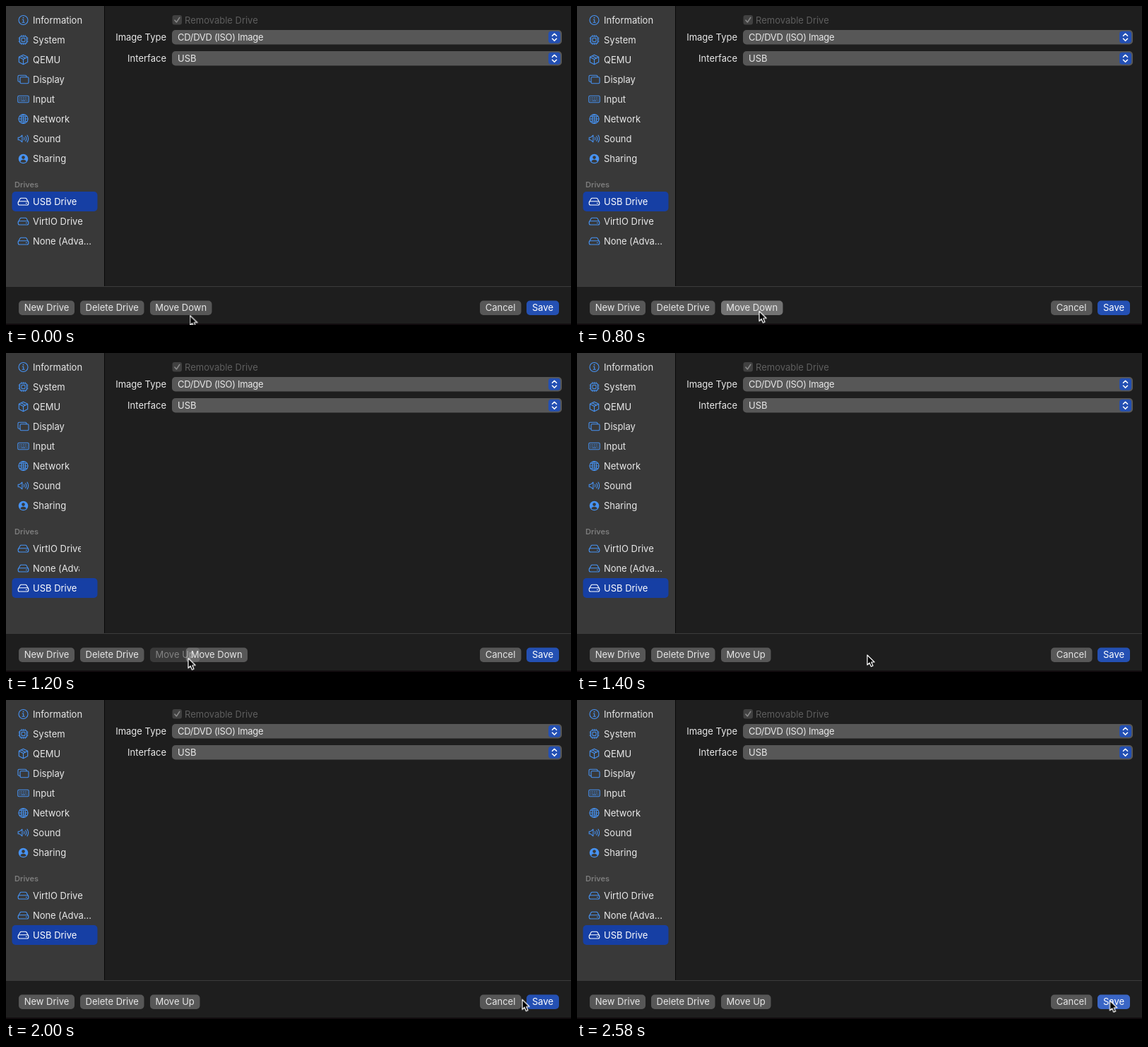
These frames come from a looping animation (800 px wide and 452 px high, 2950 ms). An HTML page:

```html
<!DOCTYPE html>
<html lang="en">
<head>
<meta charset="utf-8">
<title>Drive settings</title>
<style>
html, body { margin: 0; width: 100%; height: 100%; overflow: hidden; background: #1e1e1e; }
svg { display: block; }
text { font: 400 13px Inter, "Liberation Sans", sans-serif; fill: #e8e8e8; white-space: pre; }
.mid { text-anchor: middle; }
.end { text-anchor: end; }
.tight { letter-spacing: -.3px; }
.head { font-size: 11px; font-weight: 600; fill: #7d7d7d; }
.dim { fill: #5e5e5e; }
.icon { fill: none; stroke: #4793f3; stroke-width: 1.1; stroke-linecap: round; stroke-linejoin: round; }
.icon .solid { fill: #4793f3; stroke: none; }
.white { stroke: #fff; }
.btn { fill: #fff; fill-opacity: .255; }
.blue { fill: #2450b3; }

.usb, .virt, .none, .virt-clip, .none-clip, .up, .down, .press, .save, .cursor {
  animation: 2950ms step-end infinite;
}
.usb { animation-name: usb; }
.virt { animation-name: virt; }
.none { animation-name: none-row; }
.virt-clip { animation-name: virt-clip; }
.none-clip { animation-name: none-clip; }
.up { animation-name: up; }
.down { animation-name: down; }
.press { animation-name: press; }
.save { animation-name: save; }
.cursor { animation-name: cursor; }

@keyframes usb {
  0% { transform: translateY(277px); }
  33.898% { transform: translateY(305px); }
  40.677%, 100% { transform: translateY(333px); }
}
@keyframes virt {
  0% { transform: translateY(305px); }
  33.898%, 100% { transform: translateY(277px); }
}
@keyframes none-row {
  0% { transform: translateY(333px); }
  40.677%, 100% { transform: translateY(305px); }
}
@keyframes virt-clip {
  0% { width: 100px; }
  33.898% { width: 63px; }
  40.677% { width: 68px; }
  47.457%, 100% { width: 100px; }
}
@keyframes none-clip {
  0% { width: 100px; }
  40.677% { width: 66px; }
  47.457%, 100% { width: 100px; }
}
@keyframes up {
  0% { opacity: 0; }
  40.677% { opacity: .5; }
  47.457%, 100% { opacity: 1; }
}
@keyframes down {
  0% { transform: none; opacity: 1; }
  40.677% { transform: translateX(50.5px); opacity: 1; }
  47.457%, 100% { transform: translateX(71px); opacity: 0; }
}
@keyframes press {
  0% { fill-opacity: .255; }
  27.118% { fill-opacity: .38; }
  33.898%, 100% { fill-opacity: .255; }
}
@keyframes save {
  0% { fill: #2450b3; }
  87.457%, 100% { fill: #3a66c6; }
}
@keyframes cursor {
  0% { transform: translate(260.5px, 438.5px); opacity: 1; }
  6.779% { transform: translate(260px, 436.5px); opacity: 1; }
  13.559% { transform: translate(259px, 434.5px); opacity: 1; }
  20.339% { transform: translate(258px, 432.5px); opacity: 1; }
  47.457% { transform: translate(411px, 428px); opacity: 1; }
  54.237% { transform: translate(550px, 431px); opacity: 0; }
  61.016% { transform: translate(692px, 435px); opacity: 1; }
  67.796% { transform: translate(731px, 424.5px); opacity: 1; }
  74.576%, 100% { transform: translate(754.5px, 426px); opacity: 1; }
}
</style>
</head>
<body>
<svg width="800" height="452" viewBox="0 0 800 452">
  <defs>
    <g id="drive">
      <path d="M-7.2 1 L-4.6 -3.8 Q-4.1 -4.7 -3 -4.7 H3 Q4.1 -4.7 4.6 -3.8 L7.2 1"/>
      <rect x="-7.3" y="-.3" width="14.6" height="5.3" rx="2"/>
      <path d="M4 2.4 H4.6"/>
    </g>
    <g id="stepper">
      <rect x="-8.5" y="-8.5" width="17" height="17" rx="4" class="blue"/>
      <path d="M-3 -2 L0 -5 L3 -2 M-3 2 L0 5 L3 2" fill="none" stroke="#fff" stroke-width="1.6" stroke-linecap="round" stroke-linejoin="round"/>
    </g>
    <clipPath id="virtClip"><rect class="virt-clip" x="38" y="-12" width="100" height="24"/></clipPath>
    <clipPath id="noneClip"><rect class="none-clip" x="38" y="-12" width="100" height="24"/></clipPath>
  </defs>

  <rect width="800" height="452" fill="#1e1e1e"/>
  <rect width="139" height="397" fill="#393939"/>
  <rect x="139" width="1" height="397" fill="#080808"/>
  <rect y="397" width="800" height="1" fill="#3b3b3b"/>
  <rect y="450" width="800" height="2" fill="#100b0e"/>

  <!-- sidebar icons -->
  <g class="icon">
    <g transform="translate(24.5 20)">
      <circle r="6.5"/>
      <path d="M-1.2 -.8 H.2 V3.2 M-1.5 3.2 H1.8"/>
      <circle cy="-3.3" r=".9" class="solid"/>
    </g>
    <g transform="translate(24.5 48)">
      <rect x="-5" y="-5" width="10" height="10" rx="2"/>
      <rect x="-2.5" y="-2.5" width="5" height="5" rx=".8"/>
      <path d="M-2.5 -6.5 V-5 M0 -6.5 V-5 M2.5 -6.5 V-5 M-2.5 5 V6.5 M0 5 V6.5 M2.5 5 V6.5 M-6.5 -2.5 H-5 M-6.5 0 H-5 M-6.5 2.5 H-5 M5 -2.5 H6.5 M5 0 H6.5 M5 2.5 H6.5"/>
    </g>
    <g transform="translate(24.5 76)">
      <path d="M0 -6.8 L6.2 -3.7 V3.6 L0 6.8 L-6.2 3.6 V-3.7 Z M-6.2 -3.7 L0 -.5 L6.2 -3.7 M0 -.5 V6.8 M-3.1 -5.3 L3.1 -2.1"/>
    </g>
    <g transform="translate(24.5 104)">
      <path d="M-4.5 3.3 H-6 Q-7.5 3.3 -7.5 1.8 V-4.2 Q-7.5 -5.7 -6 -5.7 H3 Q4.5 -5.7 4.5 -4.2 V-3.2"/>
      <rect x="-4.5" y="-3.2" width="12" height="9" rx="1.5"/>
    </g>
    <g transform="translate(24.5 132)">
      <rect x="-7.7" y="-4.7" width="15.4" height="9.4" rx="1.5"/>
      <path d="M-5.3 -2.2 H5.3 M-5.3 0 H5.3" stroke-dasharray=".8 1.85"/>
      <path d="M-5.3 2.3 H-4.8 M-2.8 2.3 H2.8 M4.8 2.3 H5.3"/>
    </g>
    <g transform="translate(24.5 160)">
      <circle r="6.5"/>
      <ellipse rx="3" ry="6.5"/>
      <path d="M-6.5 0 H6.5 M0 -6.5 V6.5 M-5.2 -3.6 Q0 -1.6 5.2 -3.6 M-5.2 3.6 Q0 1.6 5.2 3.6" stroke-width=".9"/>
    </g>
    <g transform="translate(24.5 188)">
      <path d="M-7.3 -1.8 H-5 L-1.6 -4.8 V4.8 L-5 1.8 H-7.3 Z"/>
      <path d="M.9 -1.7 Q2 0 .9 1.7 M3.2 -3.3 Q5.3 0 3.2 3.3 M5.5 -4.9 Q8.7 0 5.5 4.9"/>
    </g>
    <g transform="translate(24.5 216.5)">
      <circle r="6.8" class="solid"/>
      <circle cy="-1.9" r="2.3" fill="#393939" stroke="none"/>
      <path d="M-4.2 4 Q-3.4 1.2 0 1.2 T4.2 4 Q2.5 5.5 0 5.5 T-4.2 4 Z" fill="#393939" stroke="none"/>
    </g>
  </g>

  <text x="38" y="24.5">Information</text>
  <text x="38" y="52.5">System</text>
  <text x="38" y="80.5">QEMU</text>
  <text x="38" y="108.5">Display</text>
  <text x="38" y="136.5">Input</text>
  <text x="38" y="164.5">Network</text>
  <text x="38" y="192.5">Sound</text>
  <text x="38" y="221">Sharing</text>
  <text x="12" y="257" class="head">Drives</text>

  <!-- drive list -->
  <g class="virt">
    <use href="#drive" x="24.5" class="icon"/>
    <g clip-path="url(#virtClip)"><text x="38" y="4.5">VirtIO Drive</text></g>
  </g>
  <g class="none">
    <use href="#drive" x="24.5" class="icon"/>
    <g clip-path="url(#noneClip)"><text x="38" y="4.5" letter-spacing="-.1">None (Adva…</text></g>
  </g>
  <g class="usb">
    <rect x="8.5" y="-14" width="121" height="28" rx="5" fill="#163fa4"/>
    <use href="#drive" x="24.5" class="icon white"/>
    <text x="38" y="4.5" style="fill:#fff">USB Drive</text>
  </g>

  <!-- form -->
  <rect x="235.5" y="13" width="13.5" height="13.5" rx="3" fill="#414141"/>
  <path d="M239 20.2 L241.4 23 L245.8 16.4" fill="none" stroke="#898989" stroke-width="1.6" stroke-linecap="round" stroke-linejoin="round"/>
  <text x="253" y="24.5" class="dim">Removable Drive</text>

  <text x="227" y="48.8" class="end">Image Type</text>
  <rect x="235" y="34" width="552" height="20.5" rx="5" fill="#575757"/>
  <text x="243" y="48.8" class="tight">CD/DVD (ISO) Image</text>
  <use href="#stepper" x="776.5" y="44.3"/>

  <text x="227" y="78.8" class="end">Interface</text>
  <rect x="235" y="64" width="552" height="20.5" rx="5" fill="#575757"/>
  <text x="243" y="78.8">USB</text>
  <use href="#stepper" x="776.5" y="74.3"/>

  <!-- footer -->
  <rect x="18" y="417.5" width="79" height="20.5" rx="5" class="btn"/>
  <text x="57.5" y="432.3" class="mid">New Drive</text>
  <rect x="105" y="417.5" width="90.5" height="20.5" rx="5" class="btn"/>
  <text x="150.2" y="432.3" class="mid">Delete Drive</text>
  <g class="up">
    <rect x="204" y="417.5" width="70.5" height="20.5" rx="5" class="btn"/>
    <text x="239.2" y="432.3" class="mid">Move Up</text>
  </g>
  <g class="down">
    <rect x="204" y="417.5" width="87.5" height="20.5" rx="5" class="btn press"/>
    <text x="247.7" y="432.3" class="mid">Move Down</text>
  </g>
  <rect x="671" y="417.5" width="58.5" height="20.5" rx="5" class="btn"/>
  <text x="700" y="432.3" class="mid">Cancel</text>
  <rect x="737" y="417.5" width="46" height="20.5" rx="5" class="save"/>
  <text x="760" y="432.3" class="mid" style="fill:#fff">Save</text>

  <g class="cursor">
    <path d="M0 0 V14 L3.2 11 L5.4 16.2 L8 15.1 L5.8 10 H10.2 Z" fill="#000" stroke="#fff" stroke-width="1.2" stroke-linejoin="round"/>
  </g>
</svg>
</body>
</html>
```
